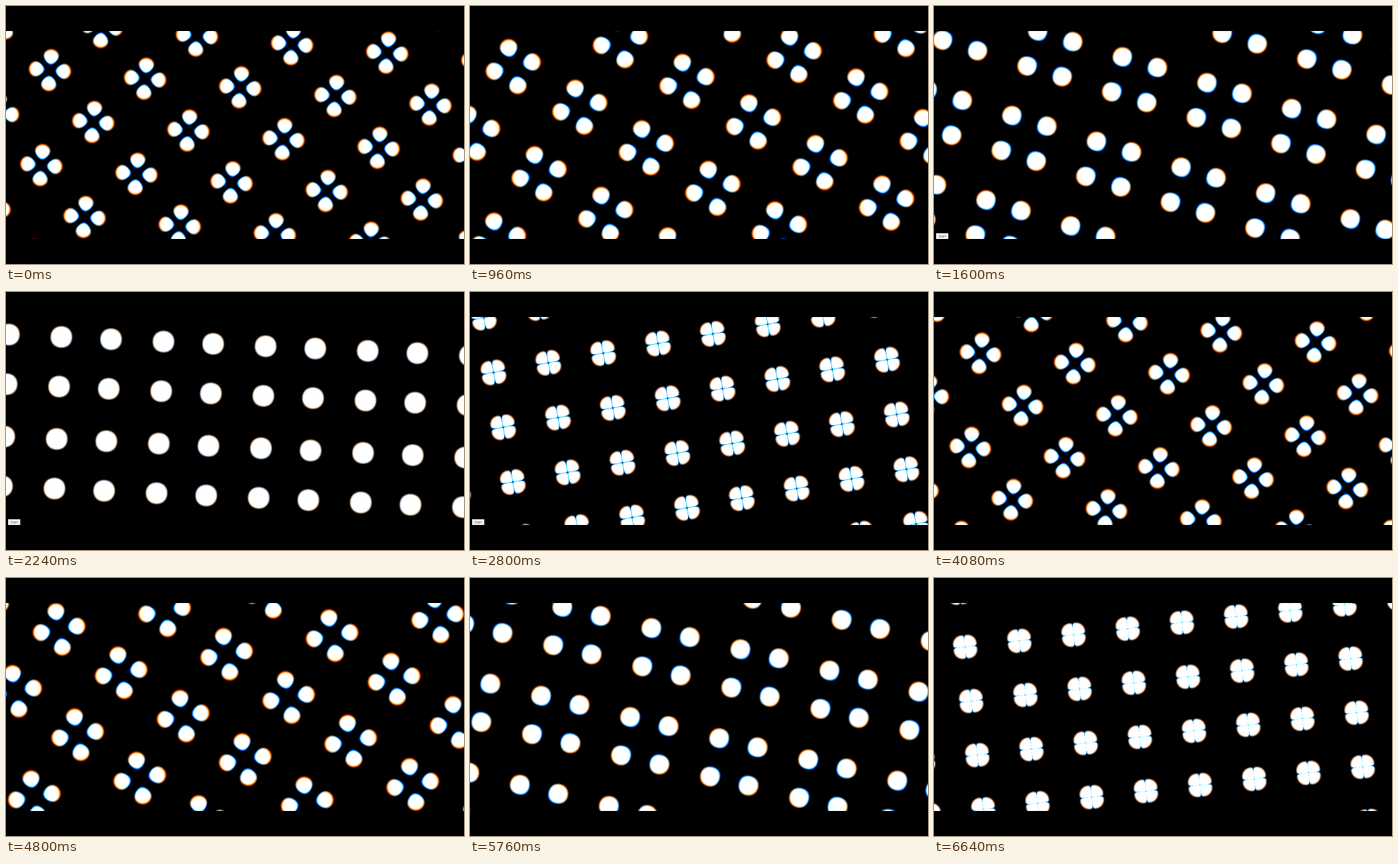
Write an HTML page with a canvas that moves like this. It is 640x361 px and loops after 6720 ms.

```html
<!DOCTYPE html>
<html lang="en">
<head>
<meta charset="utf-8">
<title>Splitting dots</title>
<style>
  html, body { margin: 0; width: 100%; height: 100%; overflow: hidden; background: #000; }
  canvas { position: absolute; left: 0; top: 0; }
  #tip {
    position: absolute; left: 3px; top: 318px; width: 17px; height: 8px;
    background: #f4f4f4; color: #555; text-align: center;
    font: 5px/8px "Open Sans", sans-serif;
  }
</style>
</head>
<body>
<canvas id="stage" width="640" height="361"></canvas>
<div id="tip" hidden>Start</div>
<script>
const LOOP = 6720, STEP = 80;
const W = 640, TOP = 35, H = 291;
const CX = 321.3, CY = 180.3;    // zoom and rotation centre
const CELL = 73.5;               // cell size at the start of a cycle
const SOFT = 0.055;              // half width of a dot's soft edge
const LAG = [0.85, 1, 1.15];     // red leads, blue trails

const ctx = document.getElementById('stage').getContext('2d');
const tip = document.getElementById('tip');
const image = ctx.createImageData(W, H);
const px = image.data;

// Split 0 is one dot per cell, 1 is four dots; level is the dot's outline.
function phase(p) {
  const split = 0.42 * p + 0.58 * p ** 5;
  const level = -0.2555 - 1.08 * split * (1 - split) ** 1.5;
  return { split, level };
}

function coverage(one, four, { split, level }) {
  const k = (one + split * four - level) / SOFT / 2 + 0.5;
  return k <= 0 ? 0 : k >= 1 ? 1 : k * k * (3 - 2 * k);
}

function draw(p) {
  const angle = (1 - p) * Math.PI / 2;
  const scale = Math.PI * (1 - p / 2) / CELL;
  const cos = Math.cos(angle) * scale, sin = Math.sin(angle) * scale;
  const [red, green, blue] = LAG.map(e => phase(p ** e));

  for (let y = 0, i = 0; y < H; y++) {
    for (let x = 0; x < W; x++, i += 4) {
      let r = 0, g = 0, b = 0;
      for (let s = 0; s < 4; s++) {
        const dx = x + 0.25 + (s & 1) / 2 - CX;
        const dy = y + TOP + 0.25 + (s >> 1) / 2 - CY;
        const u = dx * cos + dy * sin, v = dx * sin - dy * cos;
        const peak = Math.abs(Math.sin(u) * Math.sin(v));
        if (peak < 0.15) continue;
        const one = Math.log(peak);
        const four = Math.log(Math.abs(4 * Math.cos(u) * Math.cos(v)));
        r += coverage(one, four, red);
        g += coverage(one, four, green);
        b += coverage(one, four, blue);
      }
      px[i] = r * 63.75;
      px[i + 1] = g * 63.75;
      px[i + 2] = b * 63.75;
      px[i + 3] = 255;
    }
  }
  ctx.putImageData(image, 0, TOP);
}

let shown = -1;
function tick() {
  const t = Math.floor(performance.now() % LOOP / STEP) * STEP;
  if (t !== shown) {
    shown = t;
    // The motion holds briefly, then one cycle takes four seconds.
    draw(t < 240 ? 0.4425 : (0.411 + t / 4000) % 1);
    tip.hidden = t < 1600 || t >= 4000;
  }
  requestAnimationFrame(tick);
}
tick();
</script>
</body>
</html>
```
